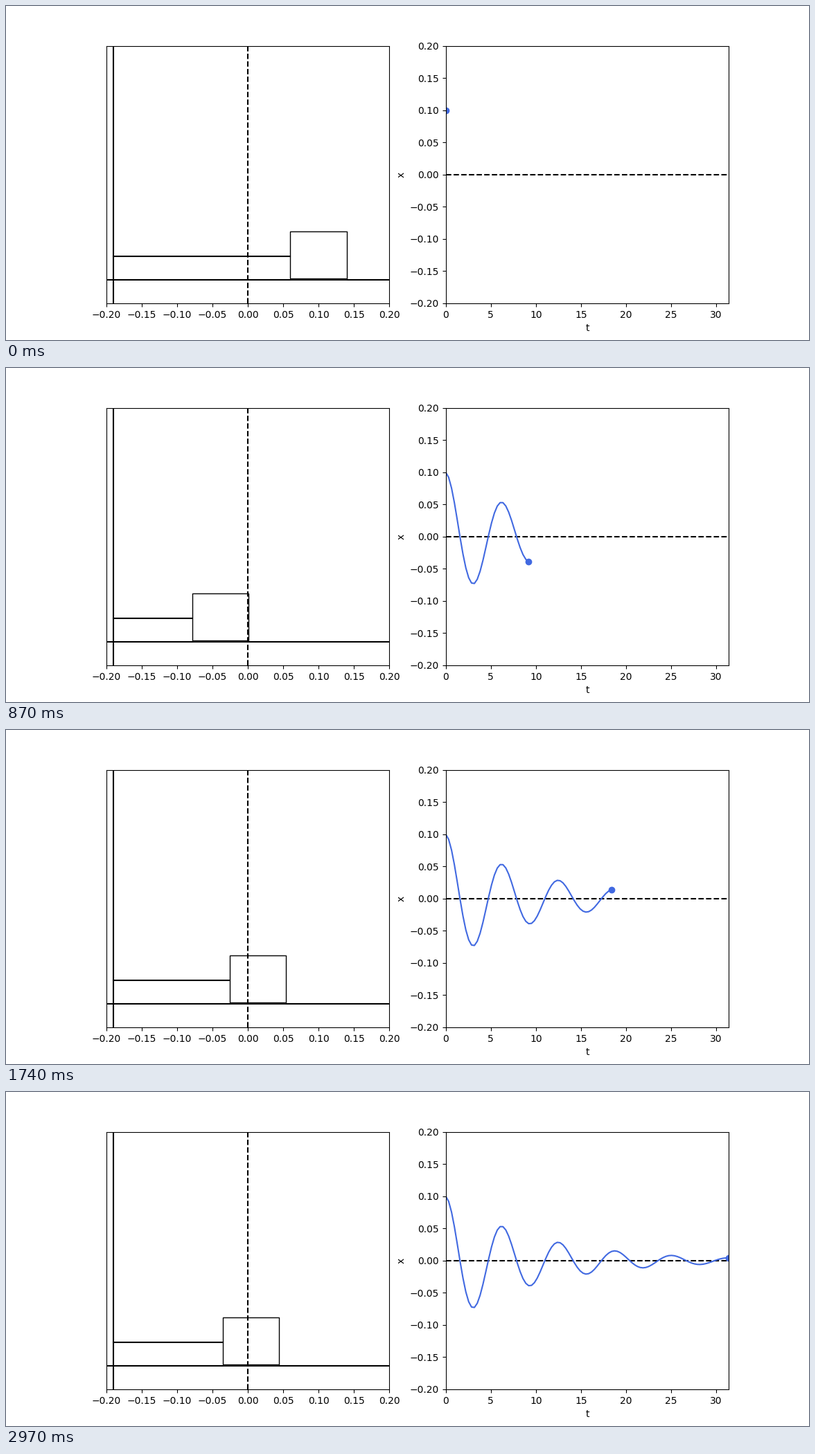
These frames come from a looping animation (1159 by 483 pixels, 3000 ms). A matplotlib script:

```python
import numpy as np
import matplotlib.pyplot as plt
from matplotlib.animation import FuncAnimation
from matplotlib.patches import Rectangle

FRAMES, INTERVAL = 100, 30
AMPLITUDE, DAMPING, OMEGA = 0.1, 0.1, 1.0
WALL_X = -0.19
BOX_W, BOX_H, BOX_Y = 0.08, 0.04, 0.0013

t = np.linspace(0, 10 * np.pi, FRAMES)
x = AMPLITUDE * np.exp(-DAMPING * t) * np.cos(OMEGA * t)

fig, (scene, graph) = plt.subplots(1, 2, figsize=(11.59, 4.83), dpi=100)

# Mass on a spring
scene.set(xlim=(-0.2, 0.2), ylim=(-0.02, 0.2), yticks=[])
scene.axvline(0, color="black", ls="--")
scene.axvline(WALL_X, color="black")
scene.axhline(0, color="black")
spring, = scene.plot([], [], color="black")
box = scene.add_patch(Rectangle((0, BOX_Y), BOX_W, BOX_H, fill=False))

# Displacement over time
graph.set(xlim=(0, t[-1]), ylim=(-0.2, 0.2), xlabel="t", ylabel="x")
graph.axhline(0, color="black", ls="--")
curve, = graph.plot([], [], color="royalblue")
dot, = graph.plot([], [], "o", color="royalblue")


def update(i):
    left = x[i] - BOX_W / 2
    box.set_x(left)
    spring.set_data([WALL_X, left], [0.02, 0.02])
    curve.set_data(t[:i + 1], x[:i + 1])
    dot.set_data([t[i]], [x[i]])
    return box, spring, curve, dot


anim = FuncAnimation(fig, update, frames=FRAMES, interval=INTERVAL, repeat=True)
plt.show()
```
